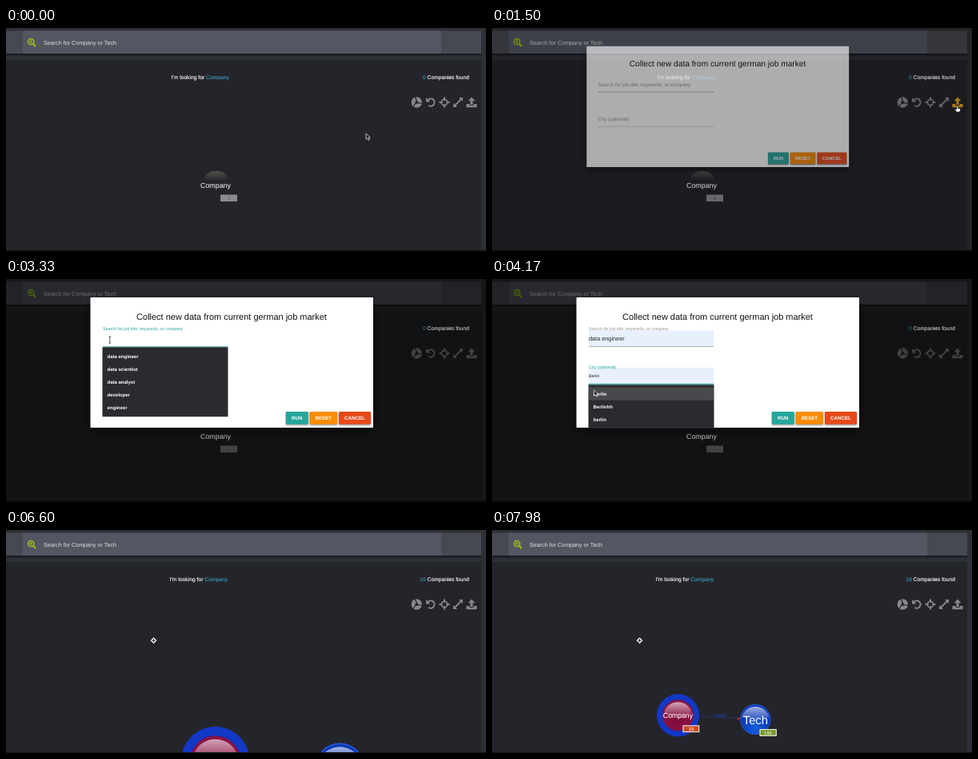
Recreate the animation shown at these times as an HTML page. Size 600 by 279 pixels, loop 8 s.

```html
<!DOCTYPE html>
<html lang="en">
<head>
<meta charset="utf-8">
<title>Company search</title>
<style>
html, body { margin: 0; width: 100%; height: 100%; overflow: hidden; background: #2d3035; }
svg { display: block; width: 100vw; height: 100vh; }
text { font-family: "Liberation Sans", Arial, Helvetica, sans-serif; text-rendering: geometricPrecision; white-space: pre; }
.mid { text-anchor: middle; }
.bold { font-weight: bold; }
</style>
</head>
<body>
<svg viewBox="0 0 600 279">
  <defs>
    <linearGradient id="dome" x1="0" y1="0" x2="0" y2="1">
      <stop offset="0" stop-color="#53544f"/><stop offset=".75" stop-color="#303135"/><stop offset="1" stop-color="#24252a"/>
    </linearGradient>
    <linearGradient id="gloss" x1="0" y1="0" x2="0" y2="1">
      <stop offset="0" stop-color="#fff" stop-opacity=".62"/><stop offset="1" stop-color="#fff" stop-opacity=".12"/>
    </linearGradient>
    <radialGradient id="wine" cy=".6"><stop offset="0" stop-color="#7c0c3c"/><stop offset="1" stop-color="#8e1240"/></radialGradient>
    <radialGradient id="azure" cy=".8"><stop offset="0" stop-color="#1460dc"/><stop offset="1" stop-color="#0c37b4"/></radialGradient>
    <filter id="soft" x="-20%" y="-20%" width="140%" height="150%"><feGaussianBlur stdDeviation="4"/></filter>
    <filter id="softer" x="-20%" y="-30%" width="140%" height="180%"><feGaussianBlur stdDeviation=".8"/></filter>
    <clipPath id="panelClip"><rect y="41" width="594" height="237"/></clipPath>
  </defs>

  <!-- page -->
  <rect width="600" height="279" fill="#2d3035"/>
  <rect y="31" width="594" height="3" fill="#17181b" filter="url(#softer)"/>
  <rect y="3.5" width="594" height="28.5" fill="#464951"/>
  <rect x="21" y="3.5" width="523" height="28.5" fill="#535762"/>
  <rect y="41" width="594" height="238" fill="#24252a"/>
  <rect y="40.5" width="594" height="1" fill="#202125"/>
  <rect y="277.5" width="600" height="1.5" fill="#17181b"/>
  <g fill="none" stroke="#a0c414">
    <circle cx="31.2" cy="17" r="3.6" stroke-width="1.5"/>
    <path d="M34 19.8l3 3.2" stroke-width="2"/>
    <path d="M29.2 17h4M31.2 15v4" stroke-width="1"/>
  </g>
  <text x="47" y="20.5" font-size="7.17" fill="#e2e3e6">Search for Company or Tech</text>
  <text id="looking" y="64" font-size="6.74" fill="#fff" stroke="#fff" stroke-width=".12">I'm looking for <tspan fill="#3fb2dc" stroke="none">Company</tspan></text>
  <text id="found" x="579" y="64" font-size="6.7" text-anchor="end" fill="#fff" stroke="#fff" stroke-width=".12"><tspan id="total" fill="#3bb0c8" stroke="none">0</tspan> Companies found</text>

  <g fill="#87888b" stroke="#87888b" stroke-width="0">
    <g transform="translate(513.3 93)">
      <circle r="6.7"/>
      <circle r="1.9" fill="#24252a"/>
      <path d="M0-1.5L-1.8-7M1.4.8L7.3 1M-1.2 1L-4.8 6" stroke="#24252a" stroke-width="1.2"/>
    </g>
    <g transform="translate(531 93)">
      <path d="M-3.8-2.9A4.7 4.7 0 1 1-2.8 4" fill="none" stroke-width="2"/>
      <path d="M-6-6v5.4h5.4z"/>
    </g>
    <g transform="translate(548 93)">
      <circle r="3.7" fill="none" stroke-width="1.7"/>
      <path d="M0-6.5v4M0 2.5v4M-6.5 0h4M2.5 0h4" stroke-width="2"/>
    </g>
    <g transform="translate(565 93)">
      <path d="M-4 4L4-4" stroke-width="1.8"/>
      <path d="M6-6v5L1-6zM-6 6v-5l5 5z"/>
    </g>
    <g id="upload" transform="translate(582 93)">
      <path d="M0-6.5L4.4-1.8H1.5V3h-3v-4.800H-4.400z"/>
      <path d="M-6.500 2h4v2h5v-2h4v4.300h-13z"/>
    </g>
  </g>

  <!-- empty node -->
  <g id="empty">
    <circle cx="262.500" cy="195" r="16" fill="#232429"/>
    <path d="M247.300 191A15.300 12.300 0 0 1 277.900 191z" fill="url(#dome)"/>
    <rect x="268" y="208.500" width="21" height="8.500" fill="#8b8c8e"/>
    <text class="mid" x="278.500" y="215" font-size="5.500" fill="#5a5b5e">0</text>
    <text id="emptyName" class="mid" x="262" y="200" font-size="8.900" fill="#fff">Company</text>
  </g>

  <!-- loaded graph, drawn around the zoom centre -->
  <g clip-path="url(#panelClip)">
    <g id="graph">
      <path d="M87 109.500L143 113" stroke="#23357c" stroke-width=".9"/>
      <path d="M142 111.200l4.500 2-4.700 1.700z" fill="#d0322a"/>
      <text class="mid" x="117" y="111" font-size="8.200" fill="#1c40b8">uses</text>
      <g transform="translate(56 108.500)">
        <circle r="30.700" fill="#1238c6"/>
        <circle r="22.300" fill="url(#wine)" stroke="#5b1a66" stroke-width=".8"/>
        <path d="M-20-3A20.200 19 0 0 1 20-3Q0 3-20-3z" fill="url(#gloss)"/>
        <text class="mid" y="4" font-size="10.050" fill="#fff" stroke="#fff" stroke-width=".15">Company</text>
        <rect x="7.500" y="15" width="23" height="9" fill="#cb4a22" stroke="#fff" stroke-width="1.100"/>
        <text class="mid" x="19" y="22.200" font-size="7" fill="#fff">19</text>
      </g>
      <g transform="translate(168 114.500)">
        <circle r="22" fill="url(#azure)"/>
        <circle r="21.300" fill="none" stroke="#2e62dc" stroke-width="1"/>
        <path d="M-19.500-3A19.700 18 0 0 1 19.500-3Q0 3-19.500-3z" fill="url(#gloss)"/>
        <text class="mid" y="6.300" font-size="17.100" fill="#fff">Tech</text>
        <rect x="6.500" y="14.500" width="23.500" height="9" fill="#7c9a2c" stroke="#fff" stroke-width="1.100"/>
        <text class="mid" x="18.200" y="21.600" font-size="7" fill="#fff">191</text>
      </g>
    </g>
  </g>

  <rect id="shade" width="600" height="279"/>
  <g id="lit"><use href="#found"/><use href="#emptyName"/></g>

  <!-- dialog -->
  <g id="modal">
    <rect x="105" y="29" width="354" height="160" fill="#000" opacity=".6" filter="url(#soft)"/>
    <rect x="105.500" y="23" width="353.500" height="163" rx="1" fill="#fff"/>
    <text class="mid" x="282" y="50.500" font-size="10.980" fill="#111">Collect new data from current german job market</text>
    <g id="fields"></g>
    <g id="buttons"></g>
  </g>
  <g id="menus"></g>

  <!-- pointers -->
  <g id="arrow"><path d="M0 0v7.200l1.700-1.500 1.300 2.700 1.300-.6-1.300-2.600h2.300z" fill="#111" stroke="#fff" stroke-width=".7"/></g>
  <g id="hand"><path d="M-.8 0Q0-.9.8 0V2.600L3.600 3.400Q4.200 3.700 4 4.800L3.300 7.600H-1L-3 4.400Q-2.600 3.400-.8 4.600z" fill="#fff" stroke="#111" stroke-width=".7"/></g>
  <g id="beam"><path d="M-1.300-4h2.600M0-4v8M-1.300 4h2.600" fill="none" stroke="#333" stroke-width=".8"/></g>
  <g id="pan">
    <path d="M0-4.200L4.200 0 0 4.200-4.200 0z" fill="#fff" stroke="#111" stroke-width=".5"/>
    <path d="M0-2.300v4.600M-2.300 0h4.600" stroke="#111" stroke-width=".9"/>
  </g>
</svg>
<script>
const LOOP = 8000;
const $ = id => document.getElementById(id);
const clamp = x => Math.min(1, Math.max(0, x));
const prog = (t, from, len) => clamp((t - from) / len);
const mix = (a, b, p) => a + (b - a) * p;
const outQuad = p => 1 - (1 - p) ** 2;
const outCubic = p => 1 - (1 - p) ** 3;
const smooth = p => p * p * (3 - 2 * p);
const set = (el, attrs) => { for (const k in attrs) el.setAttribute(k, attrs[k]); };
const show = (el, on) => { el.style.display = on ? '' : 'none'; };

function add(parent, tag, attrs, text) {
  const el = document.createElementNS('http://www.w3.org/2000/svg', tag);
  set(el, attrs);
  if (text) el.textContent = text;
  return parent.appendChild(el);
}

// Pointer legs: start, length, x, y
const START = [450, 132];
const MOVES = [
  [300, 780, 581.5, 97.5],
  [1960, 200, 364.5, 87],
  [2430, 170, 130, 75],
  [3310, 140, 127.5, 93],
  [3940, 110, 127.5, 121],
  [4080, 80, 127.5, 139],
  [4960, 780, 362.5, 171.5],
];
const OPEN = 1429, CUT = 5870, ZOOM = 6590;

function field(y, label, value, hint, times) {
  const g = $('fields');
  return {
    y, value, hint, ...times,
    fill: add(g, 'rect', { x: 121, y: y - 20, width: 156, height: 20, fill: '#e8f0fe' }),
    line: add(g, 'rect', { x: 121, y, width: 156 }),
    label: add(g, 'text', { x: 121 }, label),
    text: add(g, 'text', { x: 121, fill: '#222' }, value),
    caret: add(g, 'rect', { y: y - 14.5, width: .7, height: 8, fill: '#111' }),
  };
}

function menu(y, items) {
  const g = add($('menus'), 'g', {});
  add(g, 'rect', { x: 120.5, y, width: 157, height: 6 + 16.2 * items.length, fill: '#292b2e' });
  const hot = add(g, 'rect', { x: 121, y: y + 3, width: 156, height: 16.4, fill: '#48494c' });
  items.forEach((s, i) => add(g, 'text', {
    x: 126.5, y: y + 13.3 + 16.2 * i, class: 'bold', 'font-size': 6, fill: '#fff'
  }, s));
  return { g, hot };
}

function button(x, w, label, color) {
  const g = $('buttons');
  add(g, 'rect', { x, y: 167.3, width: w, height: 16, rx: 1, fill: '#000', opacity: .4, filter: 'url(#softer)' });
  const box = add(g, 'rect', { x, y: 166, width: w, height: 15.8, rx: 1, fill: color });
  add(g, 'text', { x: x + w / 2, y: 176.2, class: 'mid bold', 'font-size': 6.2, fill: '#fff' }, label);
  return box;
}

const fields = [
  field(84.3, 'Search for job title, keywords, or company', 'data engineer', 7.3,
    { focus: 2560, blur: 4040, menuOn: 2700, preview: 3420, pick: 3540 }),
  field(130.9, 'City (optional)', 'Berlin', 7.1,
    { focus: 4040, blur: 9000, menuOn: 4100, preview: 4140, pick: 4440 }),
];
const menus = [
  menu(85.3, ['data engineer', 'data scientist', 'data analyst', 'developer', 'engineer']),
  menu(132.3, ['Berlin', 'Berlinhh', 'berlin']),
];
const run = button(349.8, 28, 'RUN', '#26a69a');
button(379.6, 34.4, 'RESET', '#fb8c00');
button(416, 40, 'CANCEL', '#e64a19');

function drawField(f, m, t) {
  const focused = t >= f.focus && t < f.blur;
  const up = outQuad(prog(t, f.focus, 200));
  const filled = t >= f.preview, done = t >= f.pick;
  show(f.fill, filled);
  set(f.line, {
    height: focused ? 1.1 : .8,
    fill: focused ? '#2fa9b0' : f === fields[0] ? '#9a9a9a' : '#cdcdcd'
  });
  set(f.label, {
    y: mix(f.y - 7.6, f.y - 20.4, up),
    'font-size': mix(6.7, 5.37, up),
    fill: focused ? '#26a69a' : '#8f8f8f'
  });
  show(f.text, filled);
  set(f.text, { y: done ? f.y - 7.6 : f.y - 8.1, 'font-size': done ? f.hint : 5.2 });
  const since = done ? t - f.pick : t - f.focus;
  show(f.caret, focused && (done || !filled) && since % 1000 < 500);
  set(f.caret, { x: done ? 121.2 + f.text.getComputedTextLength() : 121.2 });
  show(m.g, t >= f.menuOn && t < f.pick);
  show(m.hot, filled);
}

function drawPointer(t) {
  let [x, y] = START;
  for (const [from, len, tx, ty] of MOVES) {
    const p = smooth(prog(t, from, len));
    x = mix(x, tx, p);
    y = mix(y, ty, p);
  }
  const onIcon = t >= 1080 && t < 1970;
  const inField = (t >= 2580 && t < 3380) || (t >= 4030 && t < 4100);
  const onRun = t >= 5700;
  const kind = t >= CUT ? 'pan' : onIcon || onRun ? 'hand' : inField ? 'beam' : 'arrow';
  if (kind === 'pan') [x, y] = [184.5, 138.3];
  for (const k of ['arrow', 'hand', 'beam', 'pan']) show($(k), k === kind);
  set($(kind), { transform: `translate(${x} ${y})` });
  set(run, { fill: onRun ? '#2bbbad' : '#26a69a' });
  const hot = t >= 1100 && t < 1600;
  set($('upload'), { fill: hot ? '#e2a51c' : '#87888b' });
}

function draw(t) {
  const loaded = t >= CUT;
  const open = t >= OPEN && !loaded;
  show($('empty'), !loaded);
  show($('graph'), loaded);
  $('total').textContent = loaded ? '19' : '0';
  set($('looking'), { x: loaded ? 204.7 : 206.5 });

  const zoom = .82 + .58 * Math.exp(-Math.max(0, t - ZOOM) / 545);
  set($('graph'), { transform: `translate(184 138) scale(${zoom})` });

  const dim = open ? outQuad(prog(t, OPEN, 250)) : 0;
  set($('shade'), { opacity: .52 * dim });
  set($('lit'), { opacity: .4 * dim });
  show($('lit'), open);

  const p = outCubic(prog(t, OPEN, 250));
  show($('modal'), open);
  set($('modal'), {
    opacity: p,
    transform: `translate(282 ${104.5 - 17 * (1 - p)}) scale(${.8 + .2 * p}) translate(-282 -104.5)`
  });
  show($('menus'), open);
  if (open) fields.forEach((f, i) => drawField(f, menus[i], t));
  drawPointer(t);
}

const start = performance.now();
function tick() {
  draw((performance.now() - start) % LOOP);
  requestAnimationFrame(tick);
}
tick();
</script>
</body>
</html>
```
